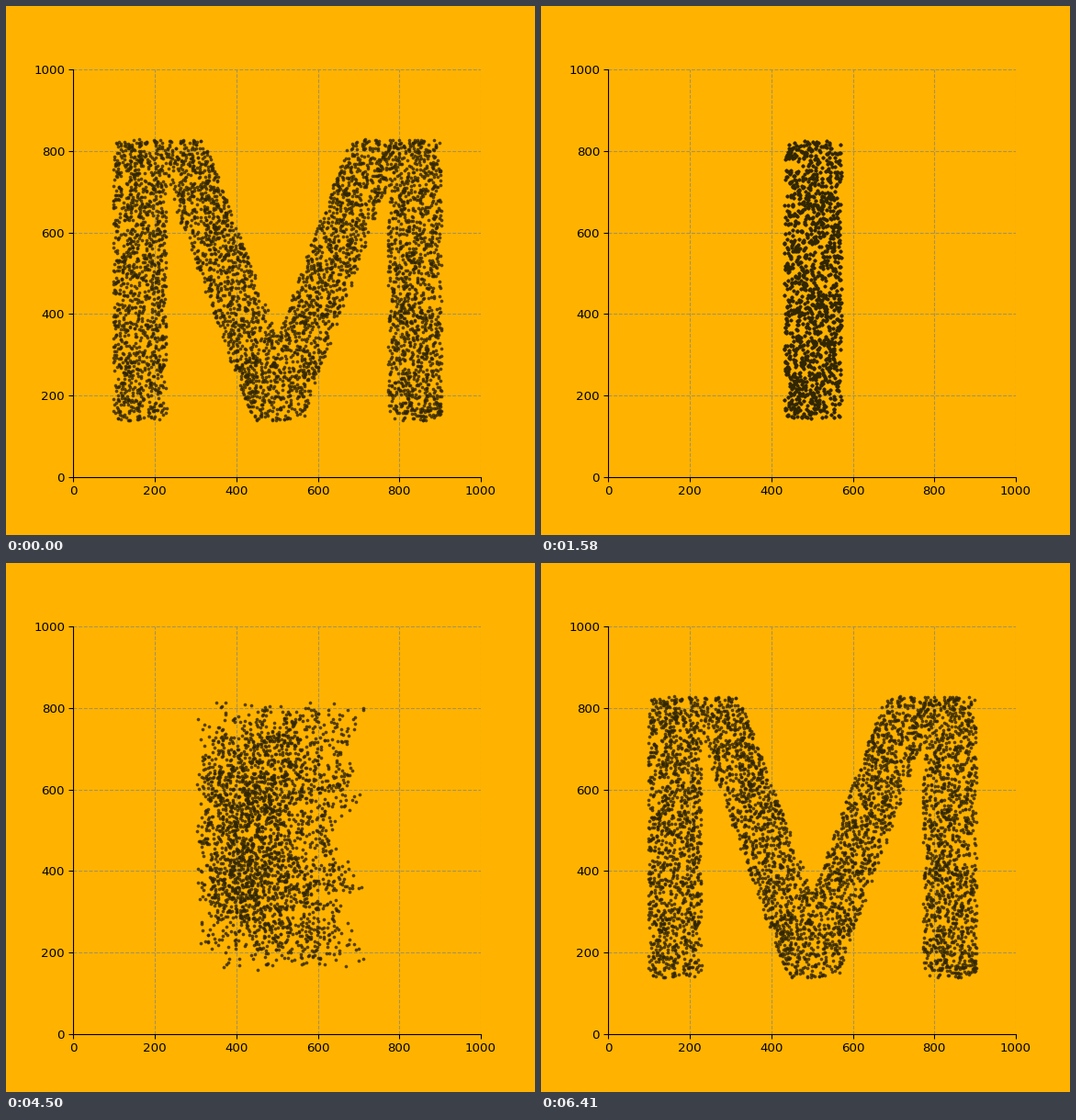
A matplotlib script for the animation above (7.06 s loop, 576 px wide and 576 px high).

```python
import numpy as np
import matplotlib.pyplot as plt
from matplotlib.animation import FuncAnimation
from matplotlib.path import Path

BG = "#ffb300"
DOT = "#302602"
GRID = "#a69258"

LOOP = 7060        # ms
INTERVAL = 20
HOLD = 650         # first change of the loop
PERIOD = 1610      # from one morph to the next
STEP, STEPS = 30, 32
DRAWS = 14400      # random points tried per letter

rng = np.random.default_rng(7)


def box(x0, y0, x1, y1, r):
    """Rounded rectangle as (inner polygon, corner radius)."""
    x0, y0, x1, y1 = x0 + r, y0 + r, x1 - r, y1 - r
    return [(x0, y0), (x1, y0), (x1, y1), (x0, y1)], r


def mirror(shape):
    poly, r = shape
    return [(1000 - x, y) for x, y in poly], r


def inside(pts, shape):
    """True for points in the polygon or within r of its border."""
    poly, r = np.array(shape[0], float), shape[1]
    hit = Path(poly).contains_points(pts)
    for a, b in zip(poly, np.roll(poly, -1, axis=0)):
        d = b - a
        t = np.clip((pts - a) @ d / (d @ d), 0, 1)
        gap = pts - a - t[:, None] * d
        hit |= np.hypot(gap[:, 0], gap[:, 1]) <= r
    return hit


def scatter_in(shapes):
    pts = rng.uniform(0, 1000, (DRAWS, 2))
    return pts[np.any([inside(pts, s) for s in shapes], axis=0)]


m_stem = box(97, 138, 228, 828, 20)
m_arm = [(221, 806), (306, 806), (547, 159), (454, 159)], 22

letters = [
    # M
    [m_stem, m_arm, mirror(m_stem), mirror(m_arm)],
    # I
    [box(432, 143, 571, 826, 14)],
    # K
    [box(280, 145, 421, 826, 14),
     ([(466, 505), (527, 505), (733, 797), (663, 800)], 30),
     ([(466, 500), (527, 500), (735, 178), (665, 175)], 30)],
    # E
    [box(307, 147, 454, 824, 20),
     box(307, 713, 713, 824, 18),
     box(307, 444, 674, 552, 18),
     box(307, 147, 713, 257, 18)],
]
clouds = [scatter_in(s) for s in letters]


def pair(a, b):
    """Match two clouds at random, repeating points of the smaller one."""
    n = max(len(a), len(b))
    return tuple(np.resize(rng.permutation(c), (n, 2)) for c in (a, b))


morphs = [pair(a, b) for a, b in zip(clouds, clouds[1:] + clouds[:1])]

fig, ax = plt.subplots(figsize=(6, 6), dpi=96, facecolor=BG)
ax.set_facecolor(BG)
ax.set(xlim=(0, 1000), ylim=(0, 1000), aspect="equal")
ticks = range(0, 1001, 200)
ax.set_xticks(ticks)
ax.set_yticks(ticks)
ax.spines[["top", "right"]].set_visible(False)
ax.grid(True, linestyle="--", color=GRID, linewidth=0.8)

dots, = ax.plot([], [], "o", color=DOT, alpha=0.7,
                markersize=1.8, markeredgewidth=1)


def draw(frame):
    since = frame * INTERVAL + INTERVAL / 2 - HOLD
    if since < 0:
        index, k = 0, 0
    else:
        index = min(int(since // PERIOD), len(morphs) - 1)
        k = min(int((since - index * PERIOD) // STEP) + 1, STEPS)
    start, end = morphs[index]
    pts = start + (end - start) * k / STEPS
    dots.set_data(pts[:, 0], pts[:, 1])
    return dots,


anim = FuncAnimation(fig, draw, frames=LOOP // INTERVAL, interval=INTERVAL,
                     repeat=True, repeat_delay=0)
plt.show()
```
